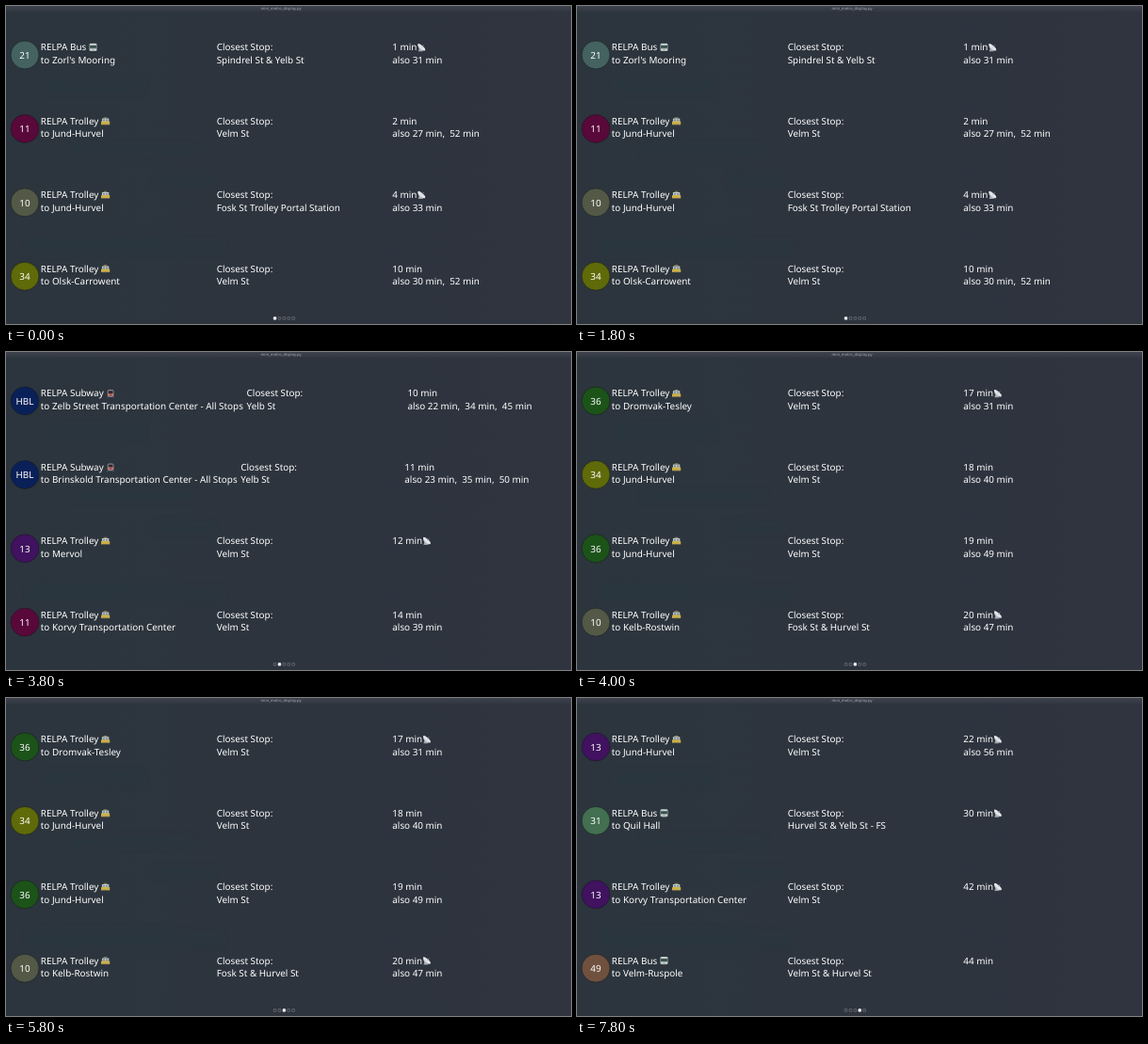
These frames come from a looping animation (600 by 338 pixels, 8 s). An HTML page:

```html
<!DOCTYPE html>
<html lang="en">
<head>
<meta charset="utf-8">
<title>Departures</title>
<style>
  html, body { margin: 0; width: 100%; height: 100%; overflow: hidden; background: #2d333d; }
  svg { display: block; width: 100vw; height: 100vh; }
  text {
    font: 9.88px "Noto Sans", sans-serif; fill: #fff;
    white-space: pre; text-rendering: geometricPrecision;
  }
  .badge { text-anchor: middle; }
  .title { font-size: 4.14px; fill: #a6a9ae; }
</style>
</head>
<body>
<svg viewBox="0 0 600 338">
  <defs>
    <linearGradient id="sky" x2="1" y2="0">
      <stop offset="0" stop-color="#2c353d"/>
      <stop offset=".5" stop-color="#2d343e"/>
      <stop offset="1" stop-color="#2f343f"/>
    </linearGradient>
    <linearGradient id="bar" x2="0" y2="1">
      <stop offset="0" stop-color="#3d424c"/>
      <stop offset="1" stop-color="#323842"/>
    </linearGradient>
    <filter id="soft"><feGaussianBlur stdDeviation="3"/></filter>

    <g id="Bus">
      <rect x="1" y=".6" width="8" height="8.2" rx="1.3" fill="#a9b5b3"/>
      <rect x="1.6" y="2.7" width="6.8" height="2.9" fill="#39504f"/>
      <path d="M2 1.6H8M2 7.2H3.6M6.4 7.2H8" stroke="#e6ebe9" stroke-width=".9"/>
      <path d="M1.8 8.8H3.2V9.4H1.8ZM6.8 8.8H8.2V9.4H6.8Z" fill="#242a2e"/>
    </g>
    <g id="Trolley">
      <path d="M3.2 1.3H6.8" stroke="#b6a65a" stroke-width=".8"/>
      <rect x="1.4" y="2" width="7.4" height="3.4" rx=".5" fill="#c3cdcf"/>
      <path d="M2.4 3.8H4.6M5.6 3.8H7.8" stroke="#73878f" stroke-width="1.6"/>
      <rect x=".5" y="5" width="9.2" height="3.6" rx=".5" fill="#cbb04a"/>
      <path d="M1.5 8.6H8.7" stroke="#5b5d55" stroke-width=".7"/>
    </g>
    <g id="Subway">
      <rect x="1.2" y=".8" width="6.8" height="7.6" rx="1.8" fill="#8d8c90"/>
      <path d="M2.2 2H7V4.8H2.2Z" fill="#30282f"/>
      <path d="M1.2 5H8V7.2H1.2Z" fill="#a5453f"/>
      <path d="M2 6.1H3.2M6 6.1H7.2" stroke="#f1e2cf" stroke-width=".9"/>
      <path d="M1 9.2L2.2 8.2H7L8.2 9.2" fill="none" stroke="#8b868a" stroke-width=".8"/>
    </g>
    <g id="dish">
      <path d="M2.6 5L1.4 9H6.4L5 6Z" fill="#a2aab1"/>
      <path d="M1.2 .8C.2 5 4 9 8.8 8Z" fill="#c3c9ce"/>
      <ellipse cx="5" cy="4.4" rx="5" ry="1.6" transform="rotate(43 5 4.4)" fill="#e3e6e8"/>
      <path d="M5 4.4L7.4 2.2" stroke="#98a2aa" stroke-width=".8"/>
    </g>
  </defs>

  <rect width="600" height="338" fill="url(#sky)"/>
  <g fill="#28393f" opacity=".38" filter="url(#soft)">
    <rect x="24" y="246" width="158" height="18"/>
    <rect x="40" y="78" width="105" height="14"/>
    <rect x="70" y="148" width="130" height="10"/>
    <rect x="160" y="180" width="60" height="12"/>
    <rect x="185" y="250" width="45" height="14"/>
  </g>
  <rect width="600" height="6" fill="url(#bar)"/>
  <text class="title" x="270.5" y="3.6">mini_metro_display.py</text>
  <g id="pages"></g>
  <g id="dots"></g>
</svg>
<script>
const PAGE_MS = 2000;
const DIGIT = 5.65;
const iconX = { Bus: 87.5, Trolley: 100.5, Subway: 106.5 };
const colors = {
  10: '#535946', 11: '#59083a', 13: '#40125f', 21: '#436260', 31: '#437050',
  34: '#5f6a09', 36: '#1c5319', 49: '#70513f', HBL: '#0a2058'
};

// route, vehicle, destination, stop, next minutes, live, later times, stop x, time x
const pages = [
  [
    [21, 'Bus', "Zorl's Mooring", 'Spindrel St & Yelb St', 1, 1, '31 min'],
    [11, 'Trolley', 'Jund-Hurvel', 'Velm St', 2, 0, '27 min,  52 min'],
    [10, 'Trolley', 'Jund-Hurvel', 'Fosk St Trolley Portal Station', 4, 1, '33 min'],
    [34, 'Trolley', 'Olsk-Carrowent', 'Velm St', 10, 0, '30 min,  52 min']
  ], [
    ['HBL', 'Subway', 'Zelb Street Transportation Center - All Stops', 'Yelb St', 10, 0, '22 min,  34 min,  45 min', 255.6, 426.4],
    ['HBL', 'Subway', 'Brinskold Transportation Center - All Stops', 'Yelb St', 11, 0, '23 min,  35 min,  50 min', 249.3, 423.3],
    [13, 'Trolley', 'Mervol', 'Velm St', 12, 1, ''],
    [11, 'Trolley', 'Korvy Transportation Center', 'Velm St', 14, 0, '39 min']
  ], [
    [36, 'Trolley', 'Dromvak-Tesley', 'Velm St', 17, 1, '31 min'],
    [34, 'Trolley', 'Jund-Hurvel', 'Velm St', 18, 0, '40 min'],
    [36, 'Trolley', 'Jund-Hurvel', 'Velm St', 19, 0, '49 min'],
    [10, 'Trolley', 'Kelb-Rostwin', 'Fosk St & Hurvel St', 20, 1, '47 min']
  ], [
    [13, 'Trolley', 'Jund-Hurvel', 'Velm St', 22, 1, '56 min'],
    [31, 'Bus', 'Quil Hall', 'Hurvel St & Yelb St - FS', 30, 1, ''],
    [13, 'Trolley', 'Korvy Transportation Center', 'Velm St', 42, 1, ''],
    [49, 'Bus', 'Velm-Ruspole', 'Velm St & Hurvel St', 44, 0, '']
  ]
];

const lines = (x, first, second) =>
  `<text x="${x}" y="47.4">${first}</text><text x="${x}" y="61.1">${second}</text>`;

function row([route, vehicle, to, stop, next, live, later, stopX = 223.7, timeX = 410.3], i) {
  const dishX = timeX + 20.4 + DIGIT * String(next).length;
  return `<g transform="translate(0 ${i * 78.4})">
    <circle cx="20" cy="52" r="15" fill="${colors[route]}" stroke="#171b20" stroke-width=".6"/>
    <text class="badge" x="20" y="55.8">${route}</text>
    ${lines(36.8, 'RELPA ' + vehicle, 'to ' + to)}
    <use href="#${vehicle}" x="${iconX[vehicle]}" y="39.2"/>
    ${lines(stopX, 'Closest Stop:', stop)}
    ${lines(timeX, next + ' min', later && 'also ' + later)}
    ${live ? `<use href="#dish" x="${dishX}" y="39.3"/>` : ''}
  </g>`;
}

const pageLayer = document.getElementById('pages');
const dotLayer = document.getElementById('dots');
pageLayer.innerHTML = pages.map(p => `<g>${p.map(row).join('')}</g>`).join('');
dotLayer.innerHTML = [0, 1, 2, 3, 4].map(i =>
  `<rect x="${284.2 + i * 4.9}" y="330.6" width="2.7" height="2.7" rx=".4" stroke-width=".5"/>`).join('');

function draw(now) {
  const current = Math.floor(now / PAGE_MS) % pages.length;
  [...pageLayer.children].forEach((g, i) => g.setAttribute('display', i === current ? 'inline' : 'none'));
  [...dotLayer.children].forEach((dot, i) => {
    dot.setAttribute('fill', i === current ? '#fff' : 'none');
    dot.setAttribute('stroke', i === current ? '#fff' : '#8a8f96');
  });
  requestAnimationFrame(draw);
}

draw(0);
</script>
</body>
</html>
```
